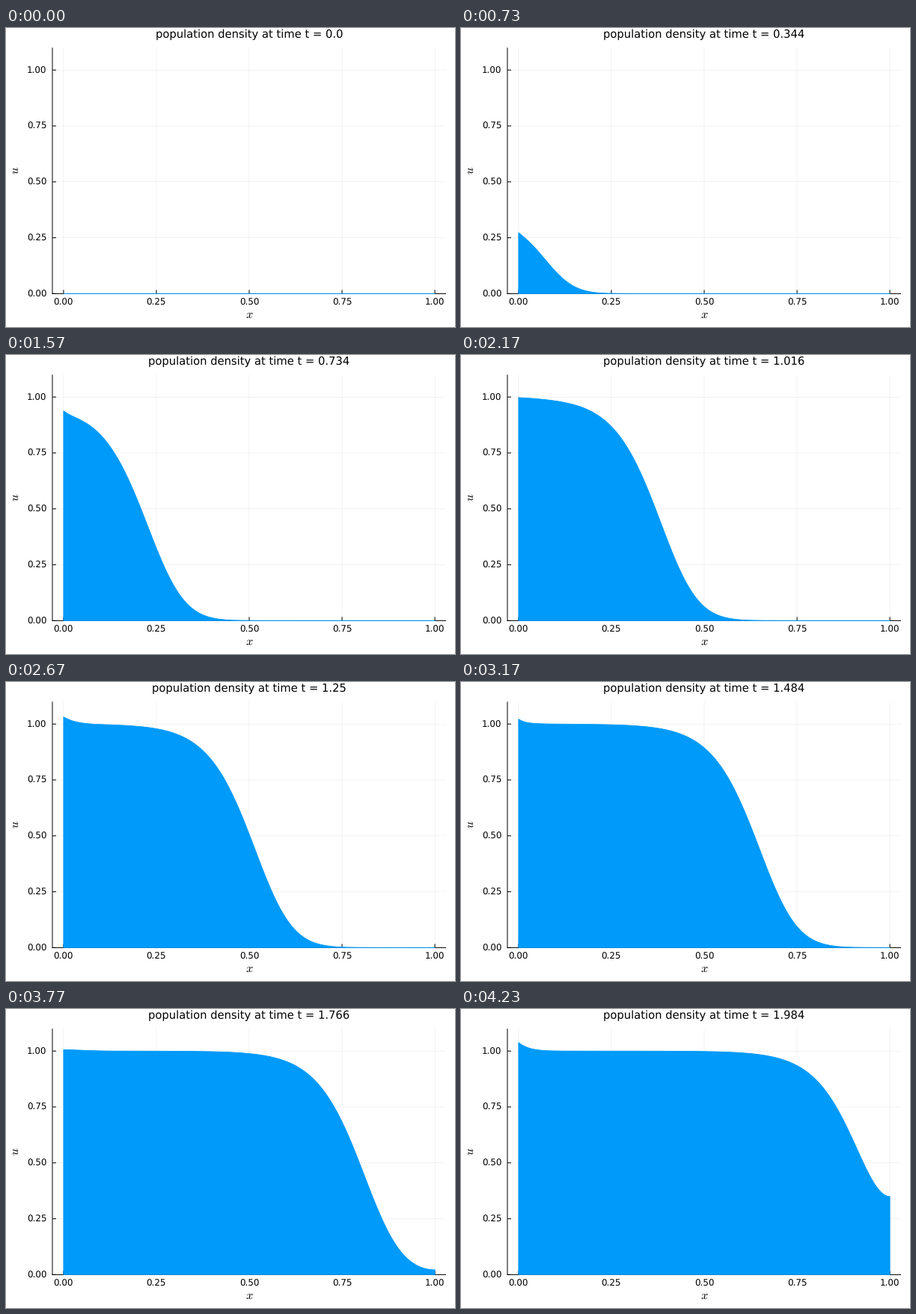
Recreate the animation shown at these times as a matplotlib script. Size 600 by 400 pixels, loop 4260 ms.

```python
import numpy as np
import matplotlib.pyplot as plt
from matplotlib.animation import FuncAnimation
from matplotlib.patches import Polygon

W, H, DPI = 600, 400, 100
LOOP, TICK = 4260, 20          # ms per loop and per animation frame
STEPS, FPS = 128, 30           # pictures shown and their pace
RATE = 64                      # pictures per unit of model time
SUB = 4                        # solver steps per picture
DT = 1 / (RATE * SUB)
N = 200
LEFT, RIGHT, TOP, BOTTOM = 62.0, 588.0, 26.3, 355.4
BLUE = "#009afa"

x = np.linspace(0, 1, N + 1)
lap = 2 * np.eye(N + 1) - np.eye(N + 1, k=1) - np.eye(N + 1, k=-1)
lap[0, 1] = lap[-1, -2] = -2   # no-flux walls

# (picture, position, density) that the wave has to pass through
KEYS = [(22, 0, .268), (22, .1, .105), (47, .2, .54), (65, .4, .365),
        (95, .65, .44), (113, .8, .48), (127, 1, .352)]


def evolve(p):
    """Solve u_t = d u_xx + r u (1 - u) with pulsing inflow at x = 0."""
    d, r, inflow = np.exp(p)
    diffuse = np.linalg.inv(np.eye(N + 1) + DT * d * N**2 * lap)
    grow = np.exp(r * DT)
    t = np.arange((STEPS - 1) * SUB) * DT
    source = 2 * DT * N * inflow * np.sin(np.pi * (t - .2) / .385) ** 2
    u = np.zeros(N + 1)
    rows = [u]
    for s in source:
        v = u.copy()
        v[0] += s
        v = diffuse @ v
        u = v * grow / (1 + v * (grow - 1))
        rows.append(u)
    return np.array(rows[::SUB])


def misfit(p):
    rows = evolve(p)
    return np.array([np.interp(a, x, rows[k]) - b for k, a, b in KEYS])


def calibrate(p, rounds=12, eps=1e-4):
    """Gauss-Newton fit of diffusion, growth and inflow (as logs)."""
    for _ in range(rounds):
        res = misfit(p)
        jac = np.array([misfit(p + eps * e) - res
                        for e in np.eye(len(p))]).T / eps
        move = np.linalg.lstsq(jac, -res, rcond=None)[0]
        p = p + np.clip(move, -.2, .2)
    return p


density = evolve(calibrate(np.log([.01, 9.5, .012])))


def px(n):
    return n * 72 / DPI


def to_x(v):
    return LEFT + (v + .03) / 1.06 * (RIGHT - LEFT)


def to_y(u):
    return BOTTOM - u / 1.1 * (BOTTOM - TOP)


plt.rcParams.update({"font.family": "DejaVu Sans", "mathtext.fontset": "cm",
                     "text.hinting": "none"})
fig = plt.figure(figsize=(W / DPI, H / DPI), dpi=DPI, facecolor="white")
ax = fig.add_axes([0, 0, 1, 1])
ax.set(xlim=(0, W), ylim=(H, 0))
ax.axis("off")


def line(xs, ys, width=1, alpha=1):
    ax.plot(xs, ys, color="black", alpha=alpha, linewidth=px(width),
            solid_capstyle="butt", snap=False)


def put(left, top, s, size, ha="center", va="baseline", **kw):
    return ax.text(left, top, s, fontsize=px(size), ha=ha, va=va, **kw)


for v in np.linspace(0, 1, 5):
    tx, ty = to_x(v), to_y(v)
    line([tx, tx], [TOP, BOTTOM], .5, .1)
    line([LEFT, RIGHT], [ty, ty], .5, .1)
    line([tx, tx], [BOTTOM, BOTTOM - 5], 1)
    line([LEFT, LEFT + 5], [ty, ty], 1)
    put(tx, 371, f"{v:.2f}", 11.84)
    put(54.5, ty + 4.3, f"{v:.2f}", 11.84, ha="right")
line([LEFT, LEFT], [TOP, BOTTOM + .5])
line([LEFT - .5, RIGHT], [BOTTOM, BOTTOM])

put(325, 388, "$x$", 16.3)
put(12.3, 190.3, "$u$", 16.3, va="center", rotation=90)
title = put(325, 13, "", 14.8)

area = Polygon([(0, 0), (1, 0), (1, 0)], facecolor=BLUE, edgecolor=BLUE,
               linewidth=px(.8), joinstyle="bevel", zorder=5, snap=False)
ax.add_patch(area)


def draw(i):
    # Pictures change on whole centiseconds, hence the small lead
    k = int((i + .5) * TICK * FPS / 1000 + .15)
    curve = np.column_stack([to_x(x), to_y(density[k])])
    area.set_xy(np.vstack([(to_x(0), BOTTOM), curve, (to_x(1), BOTTOM)]))
    title.set_text(f"population density at time t = {round(k / RATE, 3)}")
    return area, title


anim = FuncAnimation(fig, draw, frames=LOOP // TICK, interval=TICK,
                     repeat=True, repeat_delay=0)
plt.show()
```
